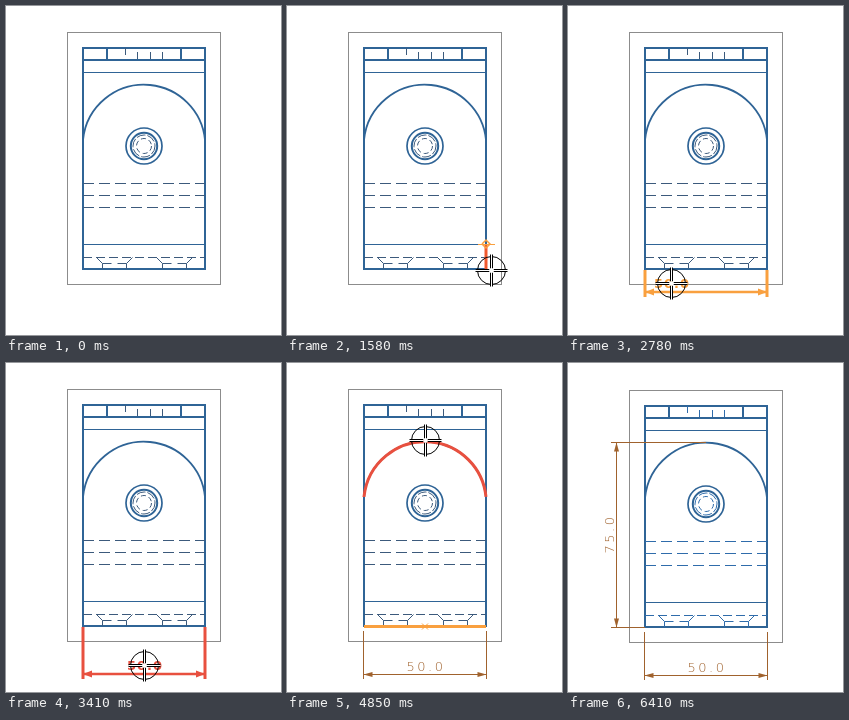
Write an HTML page with a canvas that moves like this. It is 275 by 329 pixels and loops after 6.89 s.

```html
<!DOCTYPE html>
<html lang="en">
<head>
<meta charset="utf-8">
<title>Dimensioning a part</title>
<style>
html, body { margin: 0; width: 100%; height: 100%; overflow: hidden; background: #fff; }
canvas { display: block; }
</style>
</head>
<body>
<canvas id="stage" width="275" height="329"></canvas>
<script>
const ctx = document.getElementById('stage').getContext('2d');
const LOOP = 6890, STEP = 120;
const BLUE = '#2f6496', BROWN = '#a0622d', ORANGE = '#f9a03f', RED = '#e8503f';
const LEFT = 77, RIGHT = 199, BASE = 263, TOP = 78.5, MID = 138;

// Pointer path: time, x, y
const path = [
  [1100, 214, 306], [1580, 204, 264], [1700, 200, 264], [1820, 196, 270],
  [1940, 165, 291], [2060, 115, 296], [2180, 79, 270], [2420, 77, 251],
  [2540, 80, 262], [3140, 138, 300], [3260, 138, 302], [3530, 138, 302],
  [3770, 138, 246], [4010, 138, 272], [4250, 61, 133], [4370, 30, 108],
  [4730, 154, 77], [4850, 138, 77], [4970, 138, 77], [5090, 125, 73],
  [5450, 43, 195], [5690, 43, 176], [5810, 41, 172], [6290, 41, 172]
];

function pointerAt(t) {
  const i = path.findIndex(k => k[0] > t);
  if (i < 1) return path[path.length - 1].slice(1);
  const [t0, x0, y0] = path[i - 1], [t1, x1, y1] = path[i];
  const u = (t - t0) / (t1 - t0);
  return [Math.round(x0 + (x1 - x0) * u), Math.round(y0 + (y1 - y0) * u)];
}

function stroke(color, width, dash = []) {
  ctx.strokeStyle = color;
  ctx.lineWidth = width;
  ctx.setLineDash(dash);
  ctx.stroke();
}

function line(color, width, points, dash) {
  ctx.beginPath();
  for (let i = 0; i < points.length; i += 2) ctx.lineTo(points[i], points[i + 1]);
  stroke(color, width, dash);
}

function arc(color, width, r, dash, from = 0, to = 2 * Math.PI) {
  ctx.beginPath();
  ctx.arc(MID, 140, r, from, to);
  stroke(color, width, dash);
}

function arch(color, width) {
  ctx.beginPath();
  ctx.moveTo(LEFT, 134);
  ctx.ellipse(MID, 140, 61.3, 61.3, 0, Math.PI + 0.1, -0.1);
  stroke(color, width);
}

function arrow(color, x, y, angle, half) {
  ctx.save();
  ctx.translate(x, y);
  ctx.rotate(angle);
  ctx.fillStyle = color;
  ctx.beginPath();
  ctx.moveTo(0, 0);
  ctx.lineTo(-9, half);
  ctx.lineTo(-9, -half);
  ctx.fill();
  ctx.restore();
}

function label(text, color, x, y, angle = 0, weight = 'bold') {
  ctx.save();
  ctx.translate(x, y);
  ctx.rotate(angle);
  ctx.font = weight + ' 13px "DejaVu Sans", sans-serif';
  ctx.letterSpacing = weight === 'bold' ? '1px' : '2.5px';
  ctx.textAlign = 'center';
  ctx.textBaseline = 'alphabetic';
  ctx.fillStyle = color;
  ctx.fillText(text, 1, 5);
  ctx.restore();
}

function cross(x, y) {
  line(ORANGE, 1, [x - 3, y - 3, x + 3, y + 3]);
  line(ORANGE, 1, [x - 3, y + 3, x + 3, y - 3]);
}

function handle(x, y) {
  line(ORANGE, 1, [x - 8, y + .5, x + 9, y + .5]);
  line(ORANGE, 1.5, [x - 4, y, x, y - 4, x + 4, y, x, y + 4, x - 4, y]);
}

function drawPart(hidden) {
  ctx.strokeStyle = '#8c8c8c';
  ctx.lineWidth = 1;
  ctx.setLineDash([]);
  ctx.strokeRect(61.5, 26.5, 153, 252);
  ctx.strokeStyle = BLUE;
  ctx.lineWidth = 2;
  ctx.strokeRect(LEFT, 42, RIGHT - LEFT, BASE - 42);
  line(BLUE, 2, [LEFT, 54, RIGHT, 54]);
  for (const x of [101, 175]) line(BLUE, 2, [x, 42, x, 54]);
  line(hidden, 1, [119.5, 42, 119.5, 49]);
  for (const x of [131.5, 144.5, 156.5]) line(hidden, 1, [x, 46, x, 53]);
  for (const y of [66.5, 238.5]) line(BLUE, 1, [LEFT, y, RIGHT, y]);
  arch(BLUE, 1.8);
  arc(BLUE, 1.7, 18);
  arc(BLUE, 2, 13.2);
  arc(hidden, 1, 11, [9, 2]);
  arc(hidden, 1, 7.5, [5, 3]);
  for (const y of [177.5, 189.5, 201.5]) line(hidden, 1, [LEFT, y, RIGHT, y], [11, 5]);
  line(hidden, 1, [LEFT, 251.5, RIGHT, 251.5], [9, 4]);
  for (const x of [96.5, 156.5]) {
    line(hidden, 1, [x - 6, 251.5, x, 257.5, x, 263]);
    line(hidden, 1, [x + 30, 251.5, x + 24, 257.5, x + 24, 263]);
    line(hidden, 1, [x, 257.5, x + 24, 257.5], [9, 6]);
  }
}

function widthDim(color, y, textX, textY, bold) {
  const w = bold ? 3 : 1, nudge = bold ? 0 : .5, half = bold ? 3.5 : 2.5;
  const below = y > BASE, start = bold ? 264 : 268;
  const l = bold ? LEFT : LEFT - .5, r = RIGHT + nudge;
  if (below) line(color, w, [l, start, l, y + 5]);
  line(color, w, [r, below ? start : BASE, r, below ? y + 5 : y - 5]);
  line(color, bold ? 2.5 : 1, [Math.min(l, textX - 18), y + nudge, r, y + nudge]);
  arrow(color, l, y + nudge, Math.PI, half);
  arrow(color, r, y + nudge, 0, half);
  label('50.0', color, textX, textY, 0, bold ? 'bold' : '200');
}

function heightDim(color, x, textX, textY, bold) {
  const w = bold ? 3 : 1, nudge = bold ? 0 : .5, half = bold ? 3.5 : 2.5;
  const low = BASE + .5;
  line(color, w, [x - 5, TOP, bold ? 131 : MID, TOP]);
  line(color, w, [x - 5, low, bold ? RIGHT : LEFT, low]);
  line(color, w, [x + nudge, TOP, x + nudge, low]);
  arrow(color, x + nudge, TOP, -Math.PI / 2, half);
  arrow(color, x + nudge, low, Math.PI / 2, half);
  label('75.0', color, textX, textY, -Math.PI / 2, bold ? 'bold' : '200');
}

function slantedDim(x, y) {
  const ax = RIGHT, ay = 239;
  const angle = Math.atan2(ay - y - 10, ax - x);
  line(ORANGE, 2.5, [x - 20 * Math.cos(angle), y + 10 - 20 * Math.sin(angle), ax, ay]);
  arrow(ORANGE, ax, ay, angle, 3.5);
  label('P10.0', ORANGE, x, y + 1, angle);
}

function drawPointer(x, y, ring) {
  ctx.save();
  ctx.translate(x + .5, y + .5);
  if (ring) {
    ctx.beginPath();
    ctx.arc(0, 0, 14, 0, 2 * Math.PI);
    stroke('#000', 1);
  }
  const inner = ring ? 2 : 5;
  for (let i = 0; i < 4; i++) {
    line('#fff', 2, [inner, 0, 16, 0]);
    line('#000', 1, [inner, -1, 16, -1]);
    line('#000', 1, [inner, 1, 16, 1]);
    ctx.rotate(Math.PI / 2);
  }
  ctx.fillStyle = '#fff';
  ctx.fillRect(-2, -2, 4, 4);
  if (!ring) {
    ctx.strokeStyle = '#000';
    ctx.strokeRect(-2, -2, 4, 4);
  }
  ctx.restore();
}

function drawEditing(t, x, y) {
  const during = (from, to) => t >= from && t < to;

  // Short right edge, then a slanted preview
  if (during(1460, 2540)) {
    const picked = t >= 1700;
    line(picked ? ORANGE : '#f0592e', 3, [RIGHT, 239, RIGHT, BASE]);
    handle(RIGHT, 238);
    if (picked) cross(RIGHT + .5, BASE);
  }
  if (during(1820, 2540)) slantedDim(x, y);

  // Overall width
  if (during(2540, 3530)) widthDim(t < 3140 ? ORANGE : RED, y + 9, x, y, true);
  if (t >= 3530) widthDim(BROWN, 311, 138, 303, false);

  // Bottom edge and arch, then the overall height
  if (during(3890, 5810)) {
    line(t < 4130 ? RED : ORANGE, 3, [LEFT, BASE + .5, RIGHT, BASE + .5]);
    if (t < 4130) {
      handle(LEFT, BASE);
      handle(RIGHT, BASE);
    } else cross(MID, BASE + .5);
  }
  if (during(4130, 4730)) widthDim(ORANGE, y + 11, x - 3, y + 3, true);
  if (during(4730, 5090)) arch(RED, 3);
  if (during(5090, 5810)) {
    heightDim(ORANGE, x + 9, x, y - 2, true);
    cross(MID + .5, TOP);
    line(ORANGE, 1.5, [MID - 9, 140.5, MID + 9, 140.5], [4, 3]);
    line(ORANGE, 1.5, [MID + .5, 131, MID + .5, 149], [4, 3]);
  }
  if (during(5810, 5930)) heightDim(RED, 48, 41, 171, true);
  if (t >= 5930) heightDim(BROWN, 48, 41, 171, false);
}

function stepped(t) {
  const start = t < 3410 ? 1100 : 3410;
  const s = start + Math.floor((t - start) / STEP) * STEP;
  return t < 3410 ? Math.min(s, 3260) : s;
}

function render(now) {
  const t = stepped(now % LOOP), settled = t >= 6410;
  ctx.fillStyle = '#fff';
  ctx.fillRect(0, 0, 275, 329);
  ctx.save();
  if (settled) ctx.translate(0, 1);
  drawPart(settled ? '#2f6cab' : '#3c5a7c');
  if (t >= 1100) {
    const [x, y] = pointerAt(t);
    drawEditing(t, x, y);
    if (t < 6290) drawPointer(x, y, t < 5330);
  }
  ctx.restore();
  requestAnimationFrame(render);
}
requestAnimationFrame(render);
</script>
</body>
</html>
```
